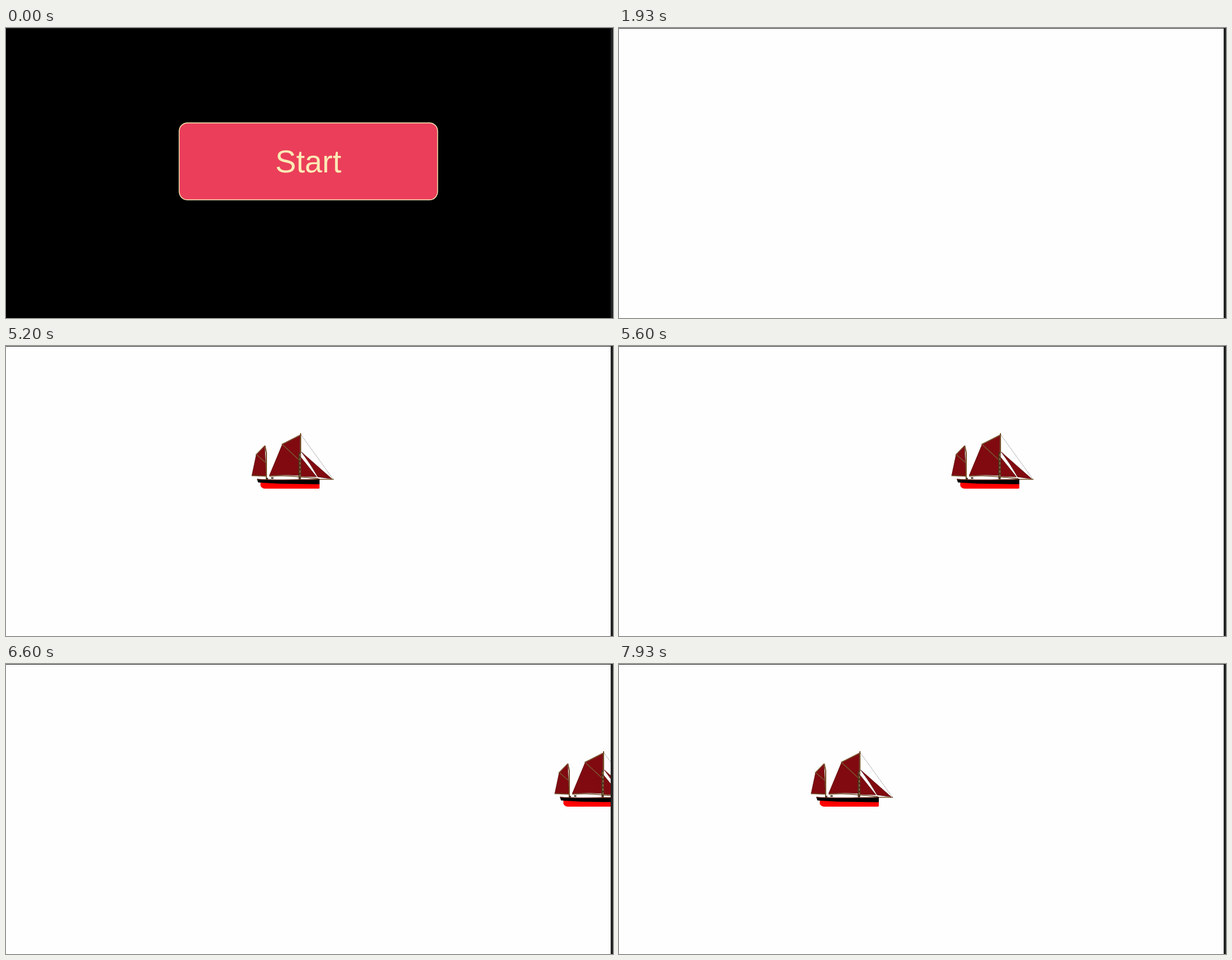
Write an HTML page that moves like this. It is 1028 px wide and 492 px high and loops after 8000 ms.

```html
<!DOCTYPE html>
<html lang="en">
<head>
<meta charset="utf-8">
<title>Sailing ship</title>
<style>
  html, body { margin: 0; width: 100%; height: 100%; overflow: hidden; background: #fefefe; }
  svg { display: block; }
</style>
</head>
<body>
<svg width="1028" height="492" viewBox="0 0 1028 492">
  <rect width="1028" height="492" fill="#fefefe"/>

  <g id="ship" stroke-linejoin="round">
    <path d="M85 4L139 79" stroke="#777" stroke-width=".8" stroke-dasharray="2 1" fill="none"/>
    <!-- sails -->
    <g fill="#800a10" stroke="#5a0c0c" stroke-width=".8">
      <path d="M9 37L23 23L25.500 73.500L1.500 72.500Z"/>
      <path d="M53 20L83 4L82 72.500Q56 71 31 73Z"/>
      <path d="M84.500 42L111 75L84.500 74Z"/>
      <path d="M85.500 33L137 78.500L113 75Q101 53 85.500 33Z"/>
    </g>
    <!-- masts, spars and booms -->
    <g fill="none" stroke="#7a5530" stroke-width="1.500">
      <path d="M8 38L23.500 22M9 37L25 51M1 73L27 74M52 20L84 4M53 20L82 47M31 74Q57 72 82 75L114 78"/>
      <path d="M23.500 22L26 34V78M84 1V34" stroke-width="2"/>
      <path d="M82.500 34V79" stroke="#4a3520" stroke-width="4"/>
      <path d="M83 36V78" stroke="#a0733f" stroke-width="1.500" stroke-dasharray="4 3"/>
      <path d="M112 79.300H140"/>
    </g>
    <path d="M25 78H29M34 77H38" stroke="#432" stroke-width="2.500"/>
    <!-- hull -->
    <path d="M16 84H116V93.500Q116 95 114 95H24Q18 95 16 90Z" fill="#f00"/>
    <path d="M10 78.500Q48 81.500 116 78.500V87.500L45 86.500L12 84.500Z" fill="#000"/>
    <path d="M10 79Q48 81 115 79" fill="none" stroke="#7a2a1c" stroke-width="1.200"/>
  </g>

  <g id="start">
    <rect width="1028" height="492" fill="#000"/>
    <rect x="293.300" y="161" width="437.700" height="130.500" rx="14" fill="#eb3e5a" stroke="#fbeab5" stroke-width="1.400"/>
    <text x="512" y="244.500" text-anchor="middle" font-size="53" fill="#fbeab5"
          font-family="'Liberation Sans', Arial, sans-serif">Start</text>
    <path id="cursor" d="M0 0V20L4.600 15.700L8 23.300L11.400 21.800L8.100 14.500H14.300Z"
          fill="#000" stroke="#fff" stroke-width="1.300"/>
  </g>

  <path d="M0 0H1028V492H1024V1H0Z" fill="#222424"/>
</svg>
<script>
const LOOP = 8000, TICK = 1000 / 15, SPEED = 0.366;
const [ship, start, cursor] = ['ship', 'start', 'cursor'].map(id => document.getElementById(id));

const progress = (t, from, to) => Math.min(1, Math.max(0, (t - from) / (to - from)));
const smooth = p => p * p * (3 - 2 * p);
const show = (el, on) => el.setAttribute('visibility', on ? 'visible' : 'hidden');
const move = (el, x, y) => el.setAttribute('transform', `translate(${x} ${y})`);

function draw(time) {
  // The picture advances fifteen times a second.
  const t = Math.floor((time % LOOP + 4) / TICK) * TICK;

  const reach = smooth(progress(t, 220, 1000));
  move(cursor, 31 + 454 * reach, 134 + 79 * reach);
  show(cursor, t > 260 && t < 1930);
  start.setAttribute('opacity', 1 - smooth(progress(t, 1360, 1930)));

  // Each trip begins at the same place; the second follows a short pause.
  const departure = t < 7390 ? 4467 : 7450;
  const x = 147 + Math.max(0, t - departure) * SPEED;
  show(ship, t > 4460 && x < 1024);
  move(ship, Math.round(x), 147);
}

const origin = performance.now();
(function frame() {
  draw(performance.now() - origin);
  requestAnimationFrame(frame);
})();
</script>
</body>
</html>
```
